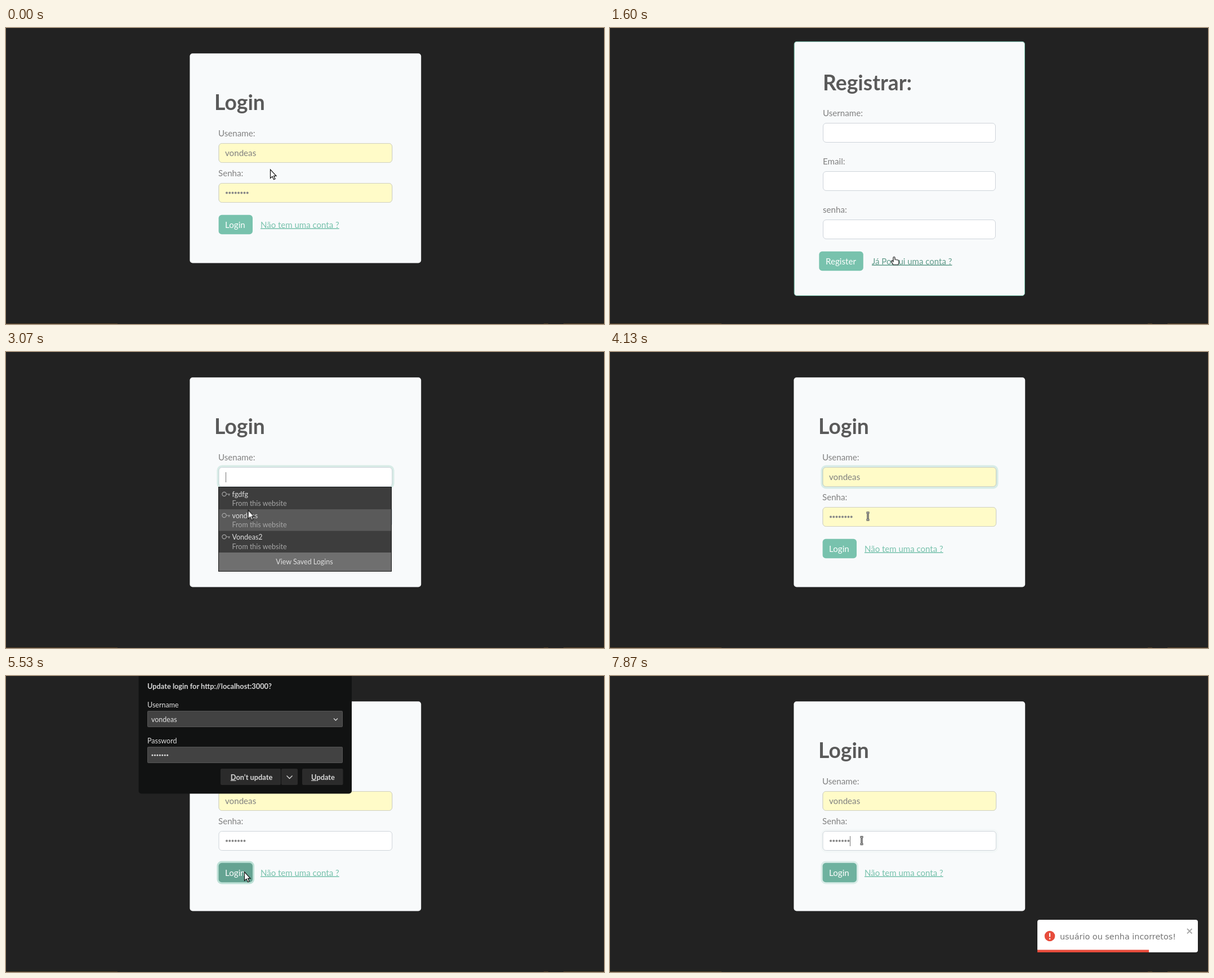
These frames come from a looping animation (1062 by 527 pixels, 8000 ms). An HTML page:

```html
<!DOCTYPE html>
<html lang="pt">
<head>
<meta charset="utf-8">
<title>Login</title>
<style>
html, body { margin: 0; width: 100%; height: 100%; overflow: hidden; background: #222; }
svg { display: block; width: 1062px; height: 527px; }
text { font: 15.15px Lato, sans-serif; fill: #808080; white-space: pre; }
.title { font-size: 37.3px; font-weight: 700; fill: #5a5a5a; }
.link { font-size: 15px; fill: #78c2ad; text-decoration: underline; }
.white { fill: #fff; }
.input { fill: #fff; stroke: #ced4da; }
.auto { fill: #fffbc8; stroke: #d0d1c0; }
.focus { fill: none; stroke: #78c2ad; stroke-opacity: .25; stroke-width: 3.6; }
.dots { fill: none; stroke: #888; stroke-width: 4; stroke-linecap: round; stroke-dasharray: 0 5.25; }
.caret { stroke: #777; }
.small text { font-size: 12.5px; fill: #e0e0e0; }
.small .sub { fill: #a6a6a6; }
.small .bold { font-size: 12.8px; font-weight: 700; fill: #d8d8d8; }
.key { text-decoration: underline; }
.chev { fill: none; stroke: #d8d8d8; stroke-width: 1.3; }

/* One 8 s loop: 1% = 80 ms */
.step, .move { animation: 8s linear infinite; }
.step { animation-timing-function: step-end; }

#login { animation-name: login; }
@keyframes login { 0%, 23.4% { opacity: 1 } 9.1% { opacity: 0 } }
#register { animation-name: register; }
@keyframes register { 0%, 23.4% { opacity: 0 } 9.1% { opacity: 1 } }
.filled { animation-name: filled; }
@keyframes filled { 0%, 41.75% { opacity: 1 } 9.1% { opacity: 0 } }
#oldPass { animation-name: oldPass; }
@keyframes oldPass { 0%, 41.75% { opacity: 1 } 9.1%, 59.1% { opacity: 0 } }
#newPass { animation-name: newPass; }
@keyframes newPass { 0% { opacity: 0 } 59.1% { opacity: 1 } }

#userFocus { animation-name: userFocus; }
@keyframes userFocus { 0%, 35.8%, 55.2%, 100% { opacity: 0 } 37.5%, 53.4% { opacity: 1 } }
#passFocus { animation-name: passFocus; }
@keyframes passFocus { 0%, 53.4%, 69.1%, 98% { opacity: 0 } 55.2%, 68.3% { opacity: 1 } 100% { opacity: .8 } }
#userCaret { animation-name: userCaret; }
@keyframes userCaret { 0%, 41.75% { opacity: 0 } 33.3% { opacity: 1 } }
#oldCaret { animation-name: oldCaret; }
@keyframes oldCaret { 0%, 59.1% { opacity: 0 } 53.4% { opacity: 1 } }
#newCaret { animation-name: newCaret; }
@keyframes newCaret { 0%, 66% { opacity: 0 } 59.1%, 98% { opacity: 1 } }

#button { animation-name: button; }
@keyframes button { 0%, 63.4%, 99.4%, 100% { fill: #78c2ad } 65.2%, 97.4% { fill: #65a392 } }
#buttonFocus { animation-name: buttonFocus; }
@keyframes buttonFocus { 0%, 68.2%, 99.4%, 100% { opacity: 0 } 69.1%, 97.4% { opacity: 1 } }
#toRegister { animation-name: toRegister; }
@keyframes toRegister { 0%, 9.1%, 27.4% { fill: #78c2ad } 6.1%, 26.7% { fill: #609b8a } }
#toLogin { animation-name: toLogin; }
@keyframes toLogin { 0%, 23.4% { fill: #78c2ad } 17.2% { fill: #609b8a } }

#list { animation-name: list; }
@keyframes list { 0%, 41.75% { opacity: 0 } 35.85% { opacity: 1 } }
#row { animation-name: row; }
@keyframes row { 0% { transform: translateY(-39px) } 37.5% { transform: none } }
#popup { animation-name: popup; }
@keyframes popup { 0%, 88.3% { opacity: 0 } 68.35% { opacity: 1 } }
#dont { animation-name: dont; }
@keyframes dont { 0%, 88.3% { fill: #2b2b2b } 77.5% { fill: #353535 } }

#toast { animation-name: toast; }
@keyframes toast {
  0% { transform: translateX(3000px) }
  70.56% { transform: translateX(3000px); animation-timing-function: cubic-bezier(.215,.61,.355,1) }
  75.81% { transform: translateX(-25px); animation-timing-function: cubic-bezier(.215,.61,.355,1) }
  77.12% { transform: translateX(10px); animation-timing-function: cubic-bezier(.215,.61,.355,1) }
  78.43% { transform: translateX(-5px); animation-timing-function: cubic-bezier(.215,.61,.355,1) }
  79.31%, 100% { transform: none }
}
#bar { transform-origin: 759px 0; animation-name: bar; }
@keyframes bar { 0%, 79.31% { transform: none } 100% { transform: scaleX(.669) } }

#pointer { animation-name: pointer; }
@keyframes pointer {
  0%, .8% { transform: translate(469px, 252px) }
  6.6% { transform: translate(505px, 350px) }
  10%, 11.6% { transform: translate(505px, 346px) }
  17.5%, 24.5% { transform: translate(505px, 407.5px) }
  31.6%, 35.8% { transform: translate(430px, 224px) }
  38.3% { transform: translate(430px, 281px) }
  41.7% { transform: translate(417px, 300px) }
  44.5% { transform: translate(416px, 301px) }
  46.6%, 47.5% { transform: translate(430px, 313px) }
  51.6%, 58.5% { transform: translate(458px, 292.5px) }
  65.8%, 70.8% { transform: translate(423px, 349px) }
  71.6% { transform: translate(426px, 350px) }
  74.1% { transform: translate(414px, 311px) }
  76.6% { transform: translate(418px, 201px) }
  78.4% { transform: translate(405px, 185px) }
  81.6%, 82.5% { transform: translate(399px, 176px) }
  84.1% { transform: translate(451px, 178px) }
  86.6%, 87.5% { transform: translate(453px, 178px) }
  89.1% { transform: translate(432px, 287px) }
  91% { transform: translate(411px, 287px) }
  96.6%, 100% { transform: translate(447px, 293px) }
}
#beam { animation-name: beam; }
@keyframes beam {
  0%, 4.3%, 14.5%, 29.7%, 36.6%, 46.1%, 61%, 76.4% { opacity: 0 }
  2.3%, 9.1%, 28.5%, 31%, 41.75%, 48.4%, 74.2%, 88.5% { opacity: 1 }
}
#hand { animation-name: hand; }
@keyframes hand { 0%, 9.1%, 23.4%, 27.4% { opacity: 0 } 6.1%, 17.2%, 26.7% { opacity: 1 } }
#arrow { animation-name: arrow; }
@keyframes arrow {
  0%, 4.3%, 14.5%, 23.4%, 27.4%, 29.7%, 36.6%, 46.1%, 61%, 76.4% { opacity: 1 }
  2.3%, 6.1%, 17.2%, 26.7%, 28.5%, 31%, 41.75%, 48.4%, 74.2%, 88.5% { opacity: 0 }
}
</style>
</head>
<body>
<svg viewBox="0 0 1062 527">
  <defs>
    <g id="keyIcon" fill="none" stroke="#a8a8a8" stroke-width="1.2">
      <circle cx="387.5" cy="0" r="3.6"/>
      <path d="M391 0H398M396 0V3"/>
    </g>
  </defs>

  <rect width="1062" height="527" fill="#222"/>
  <path d="M0 526.5H198M955 526.5H963M990 526.5H1062" stroke="#55422a"/>
  <path d="M198 526.5H955" stroke="#2a2826"/>

  <g id="login" class="step">
    <rect x="326.4" y="45.3" width="410.8" height="373.2" rx="5" fill="#f8fafb"/>
    <text class="title" x="370" y="146">Login</text>
    <text x="377" y="192.5">Usename:</text>
    <rect class="input" x="378" y="205.5" width="307.7" height="34" rx="5.5"/>
    <g class="filled step">
      <rect class="auto" x="378" y="205.5" width="307.7" height="34" rx="5.5"/>
      <text x="389" y="228">vondeas</text>
    </g>
    <rect id="userFocus" class="focus move" x="376.3" y="203.3" width="311.4" height="38.4" rx="7.5"/>
    <path id="userCaret" class="caret step" d="M390.5 214V232"/>

    <text x="377" y="263.5">Senha:</text>
    <rect class="input" x="378" y="276.5" width="307.7" height="34" rx="5.5"/>
    <g id="oldPass" class="step">
      <rect class="auto" x="378" y="276.5" width="307.7" height="34" rx="5.5"/>
      <path class="dots" d="M392 293.5h37"/>
    </g>
    <path id="newPass" class="dots step" d="M392 293.5h32"/>
    <rect id="passFocus" class="focus move" x="376.3" y="274.3" width="311.4" height="38.4" rx="7.5"/>
    <path id="oldCaret" class="caret step" d="M431.5 285V303"/>
    <path id="newCaret" class="caret step" d="M426.5 285V303"/>

    <rect id="buttonFocus" class="move" x="374.5" y="329.5" width="66.5" height="41" rx="8.5" fill="#bde0d6"/>
    <rect id="button" class="move" x="377.6" y="332.8" width="60.4" height="34.4" rx="5.5" fill="#78c2ad"/>
    <text class="white" x="389" y="355.5">Login</text>
    <text id="toRegister" class="link step" x="452" y="355.5">Não tem uma conta ?</text>
  </g>

  <g id="register" class="step">
    <rect x="327.2" y="24.3" width="409.3" height="452.2" rx="4.5" fill="#f8fafb" stroke="#78c2ad"/>
    <text class="title" x="378" y="110.5">Registrar:</text>
    <text x="378" y="157">Username:</text>
    <rect class="input" x="378.5" y="169.5" width="306" height="34" rx="5.5"/>
    <text x="378" y="242.5">Email:</text>
    <rect class="input" x="378.5" y="255.5" width="306" height="34" rx="5.5"/>
    <text x="378" y="328.5">senha:</text>
    <rect class="input" x="378.5" y="341.5" width="306" height="34" rx="5.5"/>
    <rect x="371.3" y="397.8" width="78.5" height="34.4" rx="5.5" fill="#78c2ad"/>
    <text class="white" x="383" y="420.5">Register</text>
    <text id="toLogin" class="link step" x="465" y="420.5">Já Possui uma conta ?</text>
  </g>

  <g id="list" class="small step">
    <rect x="377.5" y="240.5" width="307" height="150" fill="#3d3d3d" stroke="#161616"/>
    <rect id="row" class="step" x="378" y="280" width="306" height="38.5" fill="#5a5a5a"/>
    <rect x="378" y="357" width="306" height="33" fill="#6f6f6f"/>
    <use href="#keyIcon" y="253"/>
    <text x="401.5" y="257.5">fgdfg</text>
    <text class="sub" x="401.5" y="273.5">From this website</text>
    <use href="#keyIcon" y="291"/>
    <text x="401.5" y="295.5">vondeas</text>
    <text class="sub" x="401.5" y="312">From this website</text>
    <use href="#keyIcon" y="329"/>
    <text x="401.5" y="334">Vondeas2</text>
    <text class="sub" x="401.5" y="350.5">From this website</text>
    <text x="530" y="377.5" text-anchor="middle">View Saved Logins</text>
  </g>

  <g id="popup" class="small step">
    <rect x="235.5" y="-10" width="378.5" height="219.5" rx="5" fill="#111212"/>
    <text class="bold" x="251" y="23">Update login for http://localhost:3000?</text>
    <text x="251" y="56">Username</text>
    <rect x="251.5" y="62.5" width="346" height="28" rx="1" fill="#424242" stroke="#565656"/>
    <text x="258" y="81.5">vondeas</text>
    <path class="chev" d="M582 75.5l3.5 3.5 3.5-3.5"/>
    <text x="251" y="119.5">Password</text>
    <rect x="251.5" y="126.5" width="346" height="28" rx="1" fill="#424242" stroke="#565656"/>
    <path class="dots" d="M260 141h27" style="stroke:#ddd;stroke-width:3.2;stroke-dasharray:0 4.45"/>
    <rect id="dont" class="step" x="381" y="165" width="107" height="29" rx="2" fill="#2b2b2b"/>
    <rect x="489" y="165" width="29" height="29" rx="2" fill="#2b2b2b"/>
    <rect x="526" y="165" width="72.5" height="29" rx="2" fill="#2b2b2b"/>
    <text class="bold" x="436" y="184.5" text-anchor="middle"><tspan class="key">D</tspan>on’t update</text>
    <path class="chev" d="M498.5 177.5l5 5 5-5"/>
    <text class="bold" x="563" y="184.5" text-anchor="middle"><tspan class="key">U</tspan>pdate</text>
  </g>

  <g id="toast" class="move">
    <rect x="759" y="434" width="285" height="58" rx="4" fill="#fff"/>
    <circle cx="781" cy="463" r="9.3" fill="#e74c3c"/>
    <path d="M781 457.5V464.5M781 466.7V469" stroke="#fff" stroke-width="2.2"/>
    <text x="799" y="468.5" style="font:14.4px 'DejaVu Sans',sans-serif;fill:#757575">usuário ou senha incorretos!</text>
    <path d="M1025 450l8.5 8.5M1033.5 450l-8.5 8.5" stroke="#a8a8a8" stroke-width="1.8"/>
    <rect id="bar" class="move" x="759" y="487.5" width="285" height="4.5" fill="#e74c3c"/>
  </g>

  <g id="pointer" class="move">
    <path id="arrow" class="step" d="M.5 0V15.5L4 12.3 6.5 17.8 9 16.7 6.6 11.3H11Z" fill="#fff" stroke="#111" stroke-width="1.2"/>
    <g id="beam" class="step" fill="none">
      <path d="M-2.5-6.5H2.5M0-6.5V6.5M-2.5 6.5H2.5" stroke="#111" stroke-width="3"/>
      <path d="M-2.5-6.5H2.5M0-6.5V6.5M-2.5 6.5H2.5" stroke="#fff"/>
    </g>
    <path id="hand" class="step" d="M-2 7.5V1.5a1.5 1.5 0 0 1 3 0V4.5L6 5.5Q8 6 8 8V10.5Q8 12 6.5 14H-2L-5.5 8.5Q-6 6.5-4 6.8L-2 8.5Z" fill="#fff" stroke="#111" stroke-width="1.2"/>
  </g>
</svg>
</body>
</html>
```
